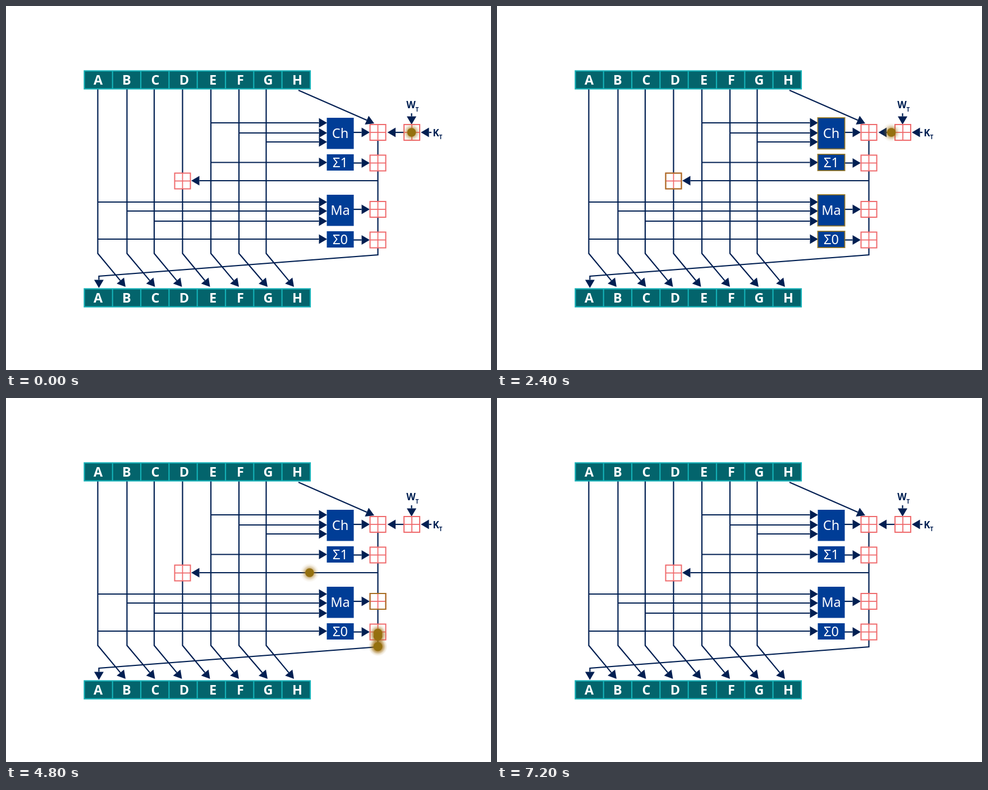
These frames come from a looping animation (864x648 px, 8 s). An HTML page with a canvas:

```html
<!DOCTYPE html>
<html lang="en">
<head>
<meta charset="utf-8">
<title>Hash round</title>
<style>
html, body { margin: 0; overflow: hidden; background: #fff; }
canvas { display: block; }
</style>
</head>
<body>
<canvas id="stage" width="864" height="648"></canvas>
<script>
const ctx = document.getElementById('stage').getContext('2d');
const NAVY = '#001f52', PINK = '#ef6a6c', GOLD = '#94700f';
const FONT = '"Noto Sans", "Open Sans", sans-serif';
const LOOP = 8000, STEP = 200;

const columns = [163.5, 215.5, 264, 314.5, 365, 415, 463.5];
const tips = [213, 265.5, 313.5, 363.5, 415, 466, 513];
const letterX = [164, 215, 266, 317.5, 368.5, 417.5, 467, 519];
const sums = [225, 279.5, 362, 416.5];
const blocks = [['Ch', 199, 55.5], ['Σ1', 264, 29], ['Ma', 336, 55.5], ['Σ0', 401, 29]];
const taps = [[4, 208], [5, 226], [6, 242], [4, 278.5], [0, 349], [1, 365], [2, 383], [0, 415]];

function text(s, x, y, size, color, weight = 500) {
  ctx.font = `${weight} ${size}px ${FONT}`;
  ctx.textAlign = 'center';
  ctx.fillStyle = color;
  ctx.fillText(s, x, y);
}

function line(pts, color = NAVY, width = 2.2) {
  ctx.beginPath();
  pts.forEach(p => ctx.lineTo(...p));
  ctx.strokeStyle = color;
  ctx.lineWidth = width;
  ctx.stroke();
}

function arrow(...pts) {
  const [x, y] = pts.at(-1), [px, py] = pts.at(-2);
  const a = Math.atan2(y - py, x - px);
  const len = Math.min(14.5, Math.hypot(x - px, y - py));
  line([...pts.slice(0, -1), [x - len * Math.cos(a), y - len * Math.sin(a)]]);
  ctx.save();
  ctx.translate(x, y);
  ctx.rotate(a);
  ctx.beginPath();
  ctx.moveTo(0, 0);
  ctx.lineTo(-14.5, -8.5);
  ctx.lineTo(-14.5, 8.5);
  ctx.fillStyle = NAVY;
  ctx.fill();
  ctx.restore();
}

function row(y) {
  ctx.fillStyle = '#03646c';
  ctx.fillRect(139.5, y, 402.5, 32);
  ctx.strokeStyle = '#14b0b6';
  ctx.lineWidth = 2.2;
  ctx.strokeRect(139.5, y, 402.5, 32);
  for (let i = 1; i < 8; i++) {
    const x = 139.5 + i * 50.3;
    line([[x, y], [x, y + 32]], '#14b0b6');
  }
  letterX.forEach((x, i) => text('ABCDEFGH'[i], x, y + 24.5, 23.5, '#fff', 600));
}

function plusBox(x, y) {
  ctx.fillStyle = '#fff';
  ctx.fillRect(x - 14, y - 14, 28, 28);
  line([[x - 14, y], [x + 14, y]], PINK, 1.8);
  line([[x, y - 14], [x, y + 14]], PINK, 1.8);
  ctx.strokeStyle = PINK;
  ctx.lineWidth = 2;
  ctx.strokeRect(x - 14, y - 14, 28, 28);
}

function diagram() {
  ctx.fillStyle = '#fff';
  ctx.fillRect(0, 0, 864, 648);
  columns.forEach((x, i) => arrow([x, 148], [x, 440.5], [tips[i], 500]));
  taps.forEach(([c, y]) => arrow([columns[c], y], [572, y]));
  arrow([521, 150], [656, 209]);
  arrow([662.5, 238], [662.5, 443], [165.5, 481], [165.5, 502]);
  arrow([662.5, 311], [330, 311]);
  arrow([709, 225], [679.5, 225]);
  arrow([758, 225], [739, 225]);
  arrow([722.5, 191], [722.5, 211]);
  row(115.5);
  row(503.5);
  blocks.forEach(([name, y, h], i) => {
    arrow([619, sums[i]], [648, sums[i]]);
    ctx.fillStyle = '#003d96';
    ctx.fillRect(571.5, y, 48, h);
    text(name, 595.5, y + h / 2 + 8, 23.5, '#fff');
    plusBox(662.5, sums[i]);
  });
  plusBox(314.5, 311.5);
  plusBox(723, 225);
  text('W', 721.5, 182, 17, NAVY, 600);
  text('T', 732.5, 187.5, 10, NAVY, 600);
  text('K', 766, 232, 17, NAVY, 600);
  text('T', 774.5, 237, 10, NAVY, 600);
}

// Point at fraction f of the path length
function along(pts, f) {
  const lens = pts.slice(1).map((p, i) => Math.hypot(p[0] - pts[i][0], p[1] - pts[i][1]));
  let d = f * lens.reduce((a, b) => a + b, 0);
  for (let i = 0; i < lens.length; i++) {
    if (d <= lens[i] || i === lens.length - 1) {
      const k = lens[i] ? Math.min(1, d / lens[i]) : 0;
      return pts[i].map((v, j) => v + (pts[i + 1][j] - v) * k);
    }
    d -= lens[i];
  }
}

function dot(x, y, alpha) {
  const glow = ctx.createRadialGradient(x, y, 6, x, y, 17);
  [0.75, 0.36, 0.1, 0].forEach((a, i) => glow.addColorStop(i / 3, `rgba(160,112,20,${a})`));
  ctx.globalAlpha = alpha;
  ctx.fillStyle = glow;
  ctx.fillRect(x - 17, y - 17, 34, 34);
  ctx.beginPath();
  ctx.arc(x, y, 7.7, 0, 7);
  ctx.fillStyle = GOLD;
  ctx.fill();
  ctx.globalAlpha = 1;
}

// Moves from start to end, waits until hold, then fades
const moves = [], flashes = [];
const move = (start, end, hold, fade, ...pts) => moves.push({ start, end, hold, fade, pts });
const flash = (peak, x, y, w, h) => flashes.push({ peak, x, y, w, h });
const flashSum = (peak, x, y) => flash(peak, x - 14, y - 14, 28, 28);

// Constants join the round
move(0, 0, 200, 0, [722.5, 225], [722.5, 225]);
move(200, 600, 600, 450, [722.5, 225], [662.5, 225]);
flashSum(1000, 662.5, 225);
move(1000, 1240, 2200, 0, [748, 225], [722.5, 225]);
move(1000, 1240, 1240, 0, [722.5, 199], [722.5, 225]);
move(2200, 2800, 2800, 400, [722.5, 225], [662.5, 225]);

// Registers feed the blocks
taps.forEach(([c, y]) => {
  const x = columns[c] + 0.8;
  move(200, 800, 1200, 0, [x, 131], [x, y - 1]);
  move(1200, 2000, 2000, 300, [x, y], [584, y]);
});
move(200, 1800, 2000, 400, [314, 131], [314, 311]);
move(200, 1400, 1400, 400, [518, 131], [521, 150], [662.5, 211]);
blocks.forEach(([, y, h]) => flash(2400, 571.5, y, 48, h));
flashSum(2400, 314.5, 311.5);

// Blocks feed the sums
sums.forEach(y => {
  move(2600, 3200, 3200, 450, [612, y], [662.5, y]);
  flashSum(3700, 662.5, y);
});

// Sums run down, one branch goes to D
move(4000, 4900, 5980, 0, [662.5, 225], [662.5, 442.5]);
move(4000, 4900, 4900, 0, [662.5, 279], [662.5, 442.5]);
move(4000, 4700, 4900, 0, [662.5, 362], [662.5, 442.5]);
move(4000, 4700, 4900, 0, [662.5, 416], [662.5, 442.5]);
flashSum(4800, 662.5, 362);
move(4585, 5200, 5700, 0, [662.5, 311], [314.5, 311]);

// Everything shifts into the next row
columns.forEach((x, i) => {
  const end = [[x + 0.5, 440], [tips[i], 500], [tips[i] + 2, 516]];
  if (i === 3) move(5700, 6200, 6200, 400, [x, 311], ...end);
  else move(5200, 5988, 6050, 400, [x + 0.5, 131], ...end);
});
move(5980, 6900, 6900, 250, [662.5, 442.5], [165.5, 481], [165.5, 516]);

function draw(t) {
  diagram();
  for (const f of flashes) {
    const a = 1 - Math.abs(t - f.peak) / 400;
    if (a <= 0) continue;
    ctx.globalAlpha = a * 0.8;
    ctx.strokeStyle = GOLD;
    ctx.lineWidth = 2;
    ctx.strokeRect(f.x, f.y, f.w, f.h);
    ctx.globalAlpha = 1;
  }
  for (const { start, end, hold, fade, pts } of moves) {
    if (t < start || t >= hold + fade) continue;
    const f = end > start ? Math.min(1, (t - start) / (end - start)) : 1;
    dot(...along(pts, f), t <= hold ? 1 : 1 - (t - hold) / fade);
  }
}

const begin = performance.now();
function tick() {
  const t = (performance.now() - begin) % LOOP;
  draw(Math.floor(t / STEP) * STEP);
  requestAnimationFrame(tick);
}
tick();
</script>
</body>
</html>
```
